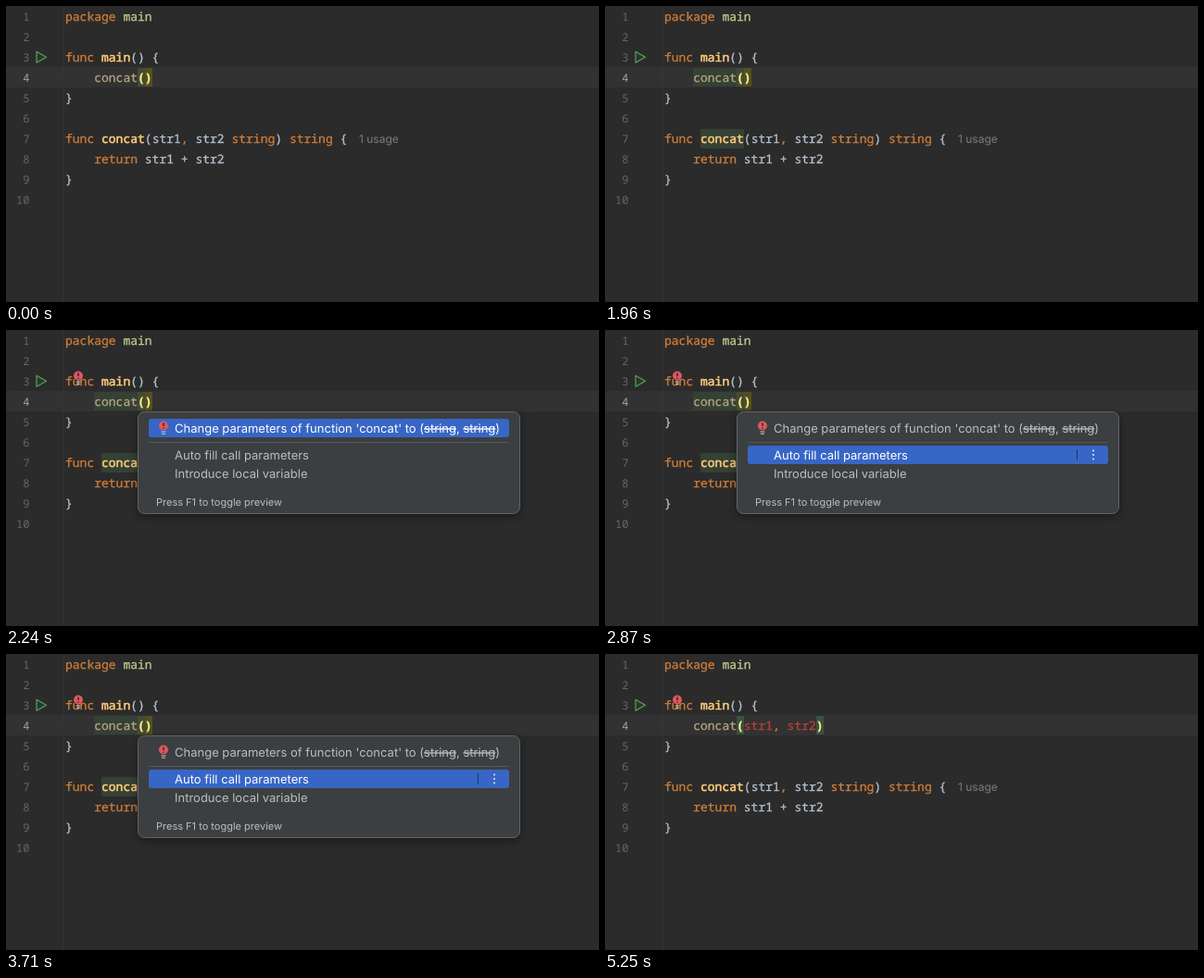
Recreate the animation shown at these times as an HTML page. Size 640x320 px, loop 5.74 s.

```html
<!DOCTYPE html>
<html lang="en">
<head>
<meta charset="utf-8">
<title>Fill call parameters</title>
<style>
html, body { margin: 0; width: 100%; height: 100%; overflow: hidden; background: #2b2b2b; }
svg { display: block; width: 640px; height: 320px; }
text { white-space: pre; text-rendering: geometricPrecision; }
.code { font: 13px "Noto Sans Mono", "DejaVu Sans Mono", monospace; color: #b4c0cd; }
/* A hairline outline gives the code its medium weight. */
.code text, .code tspan { fill: currentColor; stroke: currentColor; stroke-width: .3px; }
.nums { font: 12px "Noto Sans Mono", "DejaVu Sans Mono", monospace; fill: #646769; text-anchor: end; }
.ui { font: 13px Inter, "Open Sans", sans-serif; fill: #bbbdbf; }
.hint { font: 12px Inter, "Open Sans", sans-serif; fill: #7c7c7c; }
.foot { font-size: 11px; }
.kw { color: #cf7d38; }
.code .fn { color: #ffcb78; stroke-width: .55px; }
.pkg { color: #bccb8a; }
.call { color: #b5a384; }
.brace { color: #fdf28c; font-weight: 700; }
.strike { text-decoration: line-through; }
.usage { fill: #344134; }
.match { fill: #3b5140; }
.sel { fill: #3866c6; }
.panel { fill: #3c3f41; stroke: #626567; filter: drop-shadow(0 3px 5px #0006); }

/* Every state change is a hard cut inside one shared loop. */
[class*="t-"] { animation: 5740ms step-end infinite; }
.t-empty { animation-name: empty; }
.t-filled { animation-name: filled; }
.t-usage { animation-name: usage; }
.t-caret1 { animation-name: caret1; }
.t-caret2 { animation-name: caret2; }
.t-bulb { animation-name: bulb; }
.t-menu { animation-name: menu; }
.t-row1 { animation-name: row1; }
.t-row2 { animation-name: row2; }
.t-row3 { animation-name: row3; }
.t-wave { animation-name: wave; }
.t-args { animation-name: args; }
.t-ink1 { animation-name: ink1; }
.t-ink2 { animation-name: ink2; }
.t-ink3 { animation-name: ink3; }

@keyframes empty  { 0%, 100% { visibility: visible } 71.95% { visibility: hidden } }
@keyframes filled { 0%, 100% { visibility: hidden } 71.95% { visibility: visible } }
@keyframes usage  { 0%, 71.95%, 100% { visibility: hidden } 15.85% { visibility: visible } }
@keyframes caret1 { 0%, 34.14%, 100% { visibility: hidden } 15.85% { visibility: visible } }
@keyframes caret2 { 0%, 90.24%, 100% { visibility: hidden } 71.95% { visibility: visible } }
@keyframes bulb   { 0%, 71.95%, 100% { visibility: hidden } 36.58%, 86.58% { visibility: visible } }
@keyframes menu   { 0%, 71.95%, 100% { visibility: hidden } 36.58% { visibility: visible } }
@keyframes row1   { 0%, 49.99%, 100% { visibility: hidden } 36.58% { visibility: visible } }
@keyframes row2   { 0%, 53.65%, 71.95%, 100% { visibility: hidden } 49.99%, 64.63% { visibility: visible } }
@keyframes row3   { 0%, 64.63%, 100% { visibility: hidden } 53.65% { visibility: visible } }
@keyframes wave   { 0%, 78.04%, 100% { visibility: hidden } 71.95% { visibility: visible } }
@keyframes args   { 0%, 100% { color: #b4c0cd } 78.04% { color: #bc3f3c } }
@keyframes ink1   { 0%, 100% { fill: #fff } 49.99% { fill: #bbbdbf } }
@keyframes ink2   { 0%, 53.65%, 100% { fill: #bbbdbf } 49.99%, 64.63% { fill: #fff } }
@keyframes ink3   { 0%, 64.63%, 100% { fill: #bbbdbf } 53.65% { fill: #fff } }
</style>
</head>
<body>
<svg viewBox="0 0 640 320">
  <defs>
    <g id="bulb">
      <circle r="5" fill="#db5860"/>
      <path d="M0 -3V.6M0 2V3.3" stroke="#3a2528" stroke-width="1.5"/>
      <path d="M-2.5 6.5H2.5M-2 8.7H2" stroke="#c4c6c8" stroke-width="1.1"/>
    </g>
    <g id="more">
      <path d="M509.5 -6V6" stroke="#1f3563"/>
      <g fill="#e4e9f5">
        <circle cx="527" cy="-4.5" r="1"/><circle cx="527" r="1"/><circle cx="527" cy="4.5" r="1"/>
      </g>
    </g>
    <pattern id="zigzag" width="4" height="3" patternUnits="userSpaceOnUse" patternTransform="translate(150 82.5)">
      <path d="M-1 3L0 2.5L2 .5L4 2.5L5 3" fill="none" stroke="#bc3f3c"/>
    </pattern>
  </defs>

  <rect width="640" height="320" fill="#2b2b2b"/>
  <rect y="66" width="640" height="22" fill="#323232"/>
  <path d="M62 0V320" stroke="#363636"/>
  <g class="nums" id="nums"></g>
  <path d="M33 49.2L43.5 55.2L33 61.2Z" fill="#28392b" stroke="#54a35b" stroke-width="1.2" stroke-linejoin="round"/>

  <g class="t-usage">
    <rect class="usage" x="95" y="67" width="47" height="20"/>
    <rect class="usage" x="103" y="133" width="47" height="21"/>
  </g>
  <g class="t-empty">
    <rect x="142" y="67" width="8" height="20" fill="#444b35"/>
    <rect x="150" y="67" width="8" height="20" fill="#535020"/>
  </g>
  <g class="t-filled">
    <rect class="match" x="142" y="67" width="8" height="20"/>
    <rect class="match" x="228" y="67" width="8" height="20"/>
  </g>

  <g class="code" transform="translate(0 -.5)">
    <text x="64" y="16"><tspan class="kw">package</tspan><tspan class="pkg"> main</tspan></text>
    <text x="64" y="60"><tspan class="kw">func </tspan><tspan class="fn">main</tspan>() {</text>
    <text x="95.2" y="82" class="call">concat</text>
    <text x="142" y="82" class="brace t-empty">()</text>
    <g class="t-filled">
      <text x="142" y="82" class="brace">(</text>
      <text x="149.8" y="82" class="t-args">str1<tspan class="kw">, </tspan>str2</text>
      <text x="227.8" y="82" class="brace">)</text>
    </g>
    <text x="64" y="104">}</text>
    <text x="64" y="148"><tspan class="kw">func </tspan><tspan class="fn">concat</tspan>(str1<tspan class="kw">, </tspan>str2 <tspan class="kw">string</tspan>) <tspan class="kw">string</tspan> {</text>
    <text x="95.2" y="170"><tspan class="kw">return </tspan>str1 + str2</text>
    <text x="64" y="192">}</text>
  </g>
  <text class="hint" x="381" y="148">1 usage</text>

  <rect class="t-wave" x="150" y="82.5" width="78" height="3" fill="url(#zigzag)"/>
  <rect class="t-caret1" x="149.5" y="67" width="1.5" height="20" fill="#d0d0d0"/>
  <rect class="t-caret2" x="235.5" y="67" width="1.5" height="20" fill="#d0d0d0"/>
  <g class="t-bulb"><use href="#bulb" x="78" y="49.5"/></g>

  <g class="ui t-menu">
    <rect class="panel" x="142.5" y="88.5" width="412" height="110" rx="7"/>
    <path d="M154 121.5H543" stroke="#55585a"/>
    <rect class="sel t-row1" x="154" y="96" width="389" height="20" rx="3"/>
    <g class="t-row2">
      <rect class="sel" x="154" y="125" width="389" height="20" rx="3"/>
      <use href="#more" y="135"/>
    </g>
    <g class="t-row3">
      <rect class="sel" x="154" y="145" width="389" height="20" rx="3"/>
      <use href="#more" y="155"/>
    </g>
    <use href="#bulb" x="170" y="103.5"/>
    <text x="182" y="111" class="t-ink1">Change parameters of function 'concat' to (<tspan class="strike">string</tspan>, <tspan class="strike">string</tspan>)</text>
    <text x="182" y="140" class="t-ink2">Auto fill call parameters</text>
    <text x="182" y="160" class="t-ink3">Introduce local variable</text>
    <text x="162" y="190" class="foot">Press F1 to toggle preview</text>
  </g>
  <g class="ui t-row3">
    <rect class="panel" x="560.5" y="88.5" width="90" height="32" rx="6"/>
    <text x="573" y="109">Loading...</text>
  </g>
</svg>
<script>
const nums = document.getElementById('nums');
for (let n = 1; n <= 10; n++) {
  const label = document.createElementNS('http://www.w3.org/2000/svg', 'text');
  label.setAttribute('x', 25.5);
  label.setAttribute('y', 22 * n - 6);
  if (n === 4) label.style.fill = '#a4a3a3';
  label.textContent = n;
  nums.append(label);
}
</script>
</body>
</html>
```
